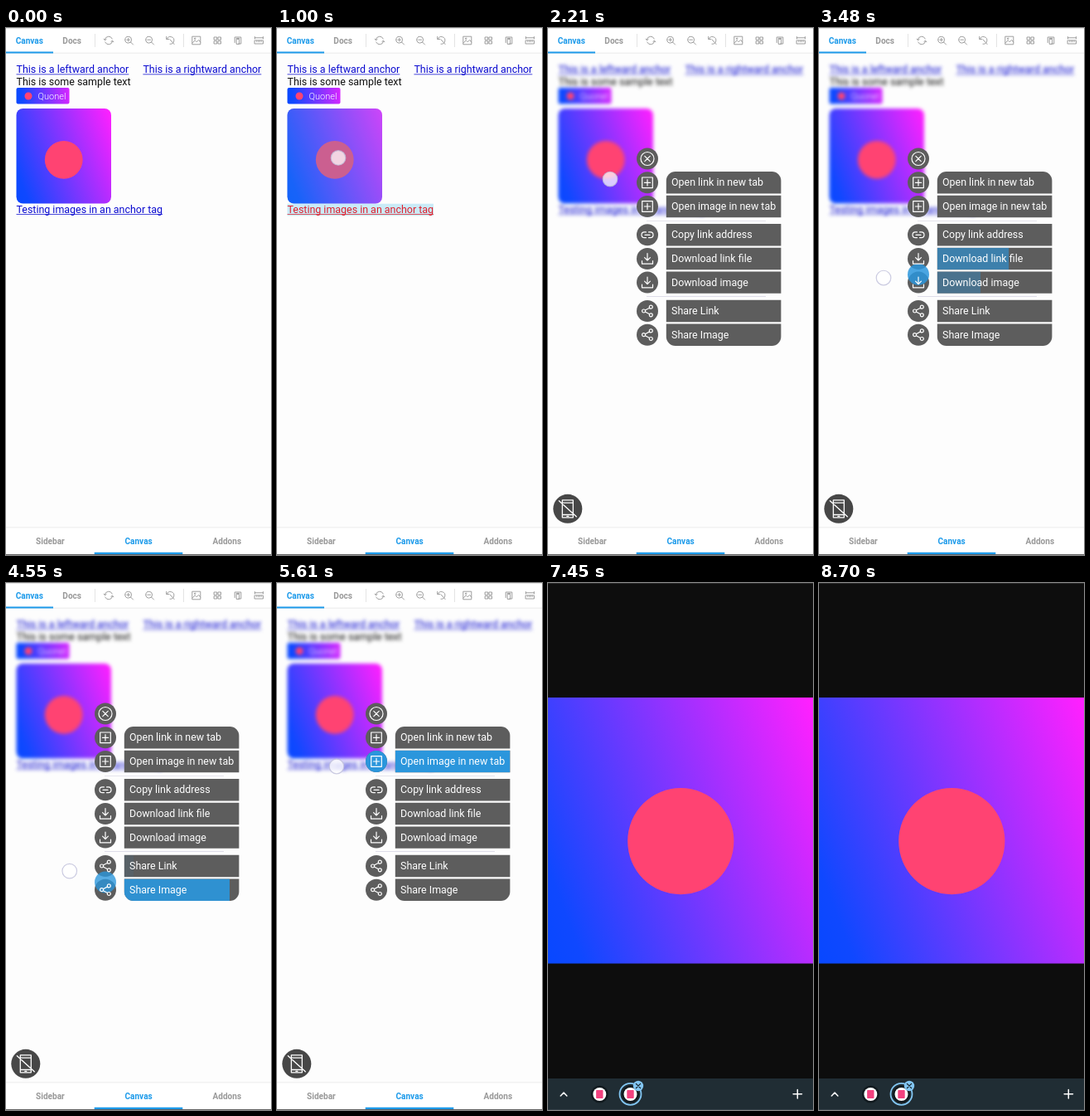
Recreate the animation shown at these times as an HTML page with a canvas. Size 320 by 635 pixels, loop 8.73 s.

```html
<!DOCTYPE html>
<html lang="en">
<head>
<meta charset="utf-8">
<title>Context menu demo</title>
<style>
html, body { margin: 0; width: 100%; height: 100%; overflow: hidden; background: #fdfdfd; }
canvas { display: block; width: 320px; height: 635px; }
</style>
</head>
<body>
<canvas id="stage"></canvas>
<script>
const W = 320, H = 635, LOOP = 8730;
const BLUE = '#1c9aea', GREY = '#999', SLATE = '#5d5d5d';
const dpr = window.devicePixelRatio || 1;
const stage = document.getElementById('stage');
const layer = document.createElement('canvas');
for (const c of [stage, layer]) { c.width = W * dpr; c.height = H * dpr; }
const main = stage.getContext('2d'), soft = layer.getContext('2d');
let g = main;

const clamp = v => Math.max(0, Math.min(1, v));
const ease = v => v * v * (3 - 2 * v);
const ramp = (t, from, len) => ease(clamp((t - from) / len));

// ---- drawing helpers ----
function box(x, y, w, h, fill, r = 0) {
  g.fillStyle = fill;
  g.beginPath();
  g.roundRect(x, y, w, h, r);
  g.fill();
}
function disc(x, y, r, fill) {
  g.fillStyle = fill;
  g.beginPath();
  g.arc(x, y, r, 0, Math.PI * 2);
  g.fill();
}
function text(str, x, y, fill, size = 12.45, weight = 400, align = 'left') {
  g.font = `${weight} ${size}px Roboto, sans-serif`;
  g.textAlign = align;
  g.fillStyle = fill;
  g.fillText(str, x, y);
  return g.measureText(str).width;
}
function link(str, x, y, color) {
  const w = text(str, x, y, color);
  box(x, y + 1.2, w, 0.9, color);
}
function icon(path, x, y, color, width = 1) {
  g.save();
  g.translate(x, y);
  g.strokeStyle = color;
  g.lineWidth = width;
  g.lineCap = g.lineJoin = 'round';
  g.stroke(new Path2D(path));
  g.restore();
}

// ---- icon outlines, centred on 0,0 ----
const ring = (x, y, r) => `M${x - r} ${y}a${r} ${r} 0 1 0 ${2 * r} 0a${r} ${r} 0 1 0 ${-2 * r} 0`;
const rect = (x, y, w, h) => `M${x} ${y}h${w}v${h}h${-w}z`;
const lens = ring(-0.8, -0.8, 3.9) + 'M2.1 2.1L5 5M-2.6-.8h3.6';
const tools = [
  [124, 'M-4.6-1A4.7 4.7 0 0 1 4.3-2M4.6 1A4.7 4.7 0 0 1-4.3 2M-5.8-1.8l1.2 1.6 1.6-1M5.8 1.8l-1.2-1.6-1.6 1'],
  [148.5, lens + 'M-.8-2.6v3.6'],
  [173.5, lens],
  [198.5, 'M-4.2-1.6A4.4 4.4 0 1 1-.5 4.3M-4.8-4.6v3.2h3.2M-.4-1L4.6 4.6'],
  [230, rect(-4.8, -4.8, 9.6, 9.6) + 'M-4.8 3l3-3.2 2 2L2.6-.6 4.8 2' + ring(-1.8, -2.2, 0.8)],
  [255.5, [[-4, -4], [0.8, -4], [-4, 0.8], [0.8, 0.8]].map(p => rect(p[0], p[1], 3.2, 3.2)).join('')],
  [280, 'M-3.8 2.5v-6.5h7.6v8h-3M-1.8 4v-5.6h3.4v5.6zM-1.8-2.6h3.6'],
  [305.5, rect(-5, 0, 10, 4) + 'M-2.5 0v1.8M0 0v1.8M2.5 0v1.8M-5-3.2h10M-5-4.4v2.4M5-4.4v2.4']
];
const plus = rect(-6.3, -6.3, 12.6, 12.6) + 'M-3.6 0h7.2M0-3.6v7.2';
const chain = 'M-1.6-3.4h-2a3.4 3.4 0 0 0 0 6.8h2M1.6-3.4h2a3.4 3.4 0 0 1 0 6.8h-2M-3 0h6';
const down = 'M0-6.5v8.4M-3.4-1.4L0 2l3.4-3.4M-6.5 2.5v3.7h13v-3.7';
const share = ring(-4.4, 0, 2) + ring(4.3, -4.8, 2) + ring(4.3, 4.8, 2) + 'M-2.6-1L2.6-3.8M-2.6 1L2.6 3.8';
const close = ring(0, 0, 8) + 'M-3.2-3.2L3.2 3.2M3.2-3.2L-3.2 3.2';

const items = [
  ['Open link in new tab', 186.3, plus],
  ['Open image in new tab', 215, plus],
  ['Copy link address', 249.3, chain],
  ['Download link file', 278, down],
  ['Download image', 306.6, down],
  ['Share Link', 341, share],
  ['Share Image', 369.7, share]
];

// ---- timing ----
const PRESS = 560, OPEN = 1240, DROP = 5780, TAB = 6060;
const path = [
  [0, 74, 156], [2120, 74, 157], [2210, 75, 182], [2600, 75, 200], [2900, 76, 232],
  [3120, 77, 264], [3360, 78, 292], [3480, 78, 301], [3800, 78, 324], [4150, 77, 355],
  [4300, 77, 366], [4500, 77, 355], [4700, 76, 324], [4880, 75, 292], [5020, 74, 264],
  [5180, 73, 230], [5400, 72, 221], [LOOP, 72, 221]
];
// time at which each item becomes the chosen one
const picks = [[2240, 0], [2600, 1], [2900, 2], [3120, 3], [3360, 4], [3800, 5], [4150, 6],
  [4500, 5], [4700, 4], [4880, 3], [5020, 2], [5180, 1]];
const FILL = 290;

function finger(t) {
  const i = path.findIndex(p => p[0] > t);
  const a = path[i - 1], b = path[i], k = (t - a[0]) / (b[0] - a[0]);
  return [a[1] + (b[1] - a[1]) * k, a[2] + (b[2] - a[2]) * k];
}
function fillOf(item, t) {
  let level = 0;
  picks.forEach(([at, n], i) => {
    if (n !== item || t < at) return;
    const out = i + 1 < picks.length ? ramp(t, picks[i + 1][0], FILL) : 0;
    level = Math.max(level, ramp(t, at, FILL) * (1 - out));
  });
  return level;
}

// ---- page ----
function gradient(x, y, w, h) {
  const d = g.createLinearGradient(x, y + h, x + w * 1.19, y + h * 0.55);
  d.addColorStop(0, '#0848ff');
  d.addColorStop(0.1, '#0f48ff');
  d.addColorStop(1, '#ff20ff');
  return d;
}
function picture(x, y, size, r) {
  box(x, y, size, size, gradient(x, y, size, size), r);
  disc(x + size * 0.5, y + size * 0.54, size * 0.2, '#ff4372');
}
function content(held) {
  const ink = '#0b0bd0';
  link('This is a leftward anchor', 12.5, 54.2, ink);
  link('This is a rightward anchor', 165.4, 54.2, ink);
  text('This is some sample text', 12.5, 68.8, '#111');
  box(12.5, 72, 64, 19.5, gradient(12.5, 72, 64, 19.5), 2);
  disc(27, 82, 4.5, '#ff4372');
  text('Quonel', 38.5, 86, '#fff', 11, 300);
  picture(12.5, 97, 114.5, 8);
  const tap = `rgba(51,181,229,${0.25 * held})`;
  box(12.5, 97, 114.5, 114.5, tap, 8);
  box(12.5, 211.8, 176.5, 14.4, tap);
  link('Testing images in an anchor tag', 12.5, 223, held > 0.5 ? '#e0202c' : ink);
}
function chrome() {
  box(0, 0, W, 30, '#fff');
  box(0, 0, W, 0.8, '#ddd');
  box(0, 29.7, W, 0.8, '#e4e4e4');
  box(0, 28.4, 57, 2.2, BLUE);
  text('Canvas', 28.3, 18.6, BLUE, 10.11, 700, 'center');
  text('Docs', 79.7, 18.6, GREY, 10.11, 700, 'center');
  box(107, 7, 0.8, 16, '#ddd');
  box(214, 7, 0.8, 16, '#ddd');
  for (const [x, p] of tools) icon(p, x, 15, GREY, 0.95);
  box(0, 602, W, 33, '#fff');
  box(0, 601.5, W, 0.8, '#e8e8e8');
  ['Sidebar', 'Canvas', 'Addons'].forEach((s, i) =>
    text(s, 53.4 + i * 106.7, 622.3, i === 1 ? BLUE : GREY, 10.11, 700, 'center'));
  box(106.7, 631.8, 106.6, 2.4, BLUE);
  box(0, 634.2, W, 0.8, '#333');
}

function menu(t, show) {
  g.save();
  g.globalAlpha = show;
  for (const y of [232.3, 323.5]) box(119, y - 0.4, 144, 0.8, '#dedce8');
  disc(120, 157.5, 13, SLATE);
  icon(close, 120, 157.5, '#fff', 1.2);
  for (const [, y] of items) disc(120, y, 13, SLATE);

  // blue marker gliding between the round icons
  let n = picks.length - 1;
  while (n >= 0 && picks[n][0] > t) n--;
  if (n >= 0) {
    const k = clamp((t - picks[n][0]) / FILL);
    const to = items[picks[n][1]][1], from = n ? items[picks[n - 1][1]][1] : to;
    const glide = 1 - (1 - k) * (1 - k);
    g.globalAlpha = show * (n ? 0.75 + 0.25 * k : k);
    disc(120, from + (to - from) * glide, 13, '#2b96dc');
    g.globalAlpha = show;
  }
  items.forEach(([label, y, p], i) => {
    icon(p, 120, y, '#fff', 1.2);
    const r = i === 0 ? [11, 11, 0, 0] : i === items.length - 1 ? [0, 0, 11, 11] : 0;
    g.save();
    box(142.8, y - 13.2, 138.6, 26.4, SLATE, r);
    const f = fillOf(i, t);
    if (f > 0) {
      g.clip();
      g.globalAlpha = show * f;
      box(142.8, y - 13.2, 138.6 * f, 26.4, '#2b96dc');
    }
    g.restore();
    text(label, 149, y + 4.1, '#fff');
  });
  disc(23.8, 579.3, 17.5, '#474747');
  icon(rect(-6.5, -10.5, 13, 21) + 'M-6.5-7.2h13M-6.5 7.2h13M-1 9h2M-10.5-9.5L10.5 9.5', 23.8, 579.3, '#fff', 1.3);
  g.restore();
}

function blurred(amount) {
  g = soft;
  g.setTransform(dpr, 0, 0, dpr, 0, 0);
  g.clearRect(0, 0, W, H);
  content(0);
  g = main;
  g.save();
  g.filter = `blur(${amount * dpr}px)`;
  g.drawImage(layer, 0, 0, W, H);
  g.restore();
}

function touch(t) {
  const a = ramp(t, PRESS, 120) * (1 - ramp(t, DROP, 140));
  if (!a) return;
  const [x, y] = finger(t);
  g.save();
  g.globalAlpha = a;
  disc(x, y, 8.8, 'rgba(255,255,255,.74)');
  g.strokeStyle = 'rgba(190,190,218,.8)';
  g.lineWidth = 1.2;
  g.stroke();
  g.restore();
}

// ---- image tab ----
function favicon(x) {
  disc(x, 616, 10.5, '#111a1f');
  disc(x, 616, 8, '#fff');
  box(x - 4.2, 611, 8.4, 10, '#f2427f', 0.8);
}
function imageTab(show) {
  g.save();
  g.globalAlpha = show;
  box(0, 0, W, H, '#0d0d0d');
  box(0, 0, W, 0.8, '#333');
  picture(0, 138, 320.6, 0);
  box(0, 597, W, 38, '#202d34');
  icon('M-3.8 2L0-2 3.8 2', 19, 616, '#fff', 1.5);
  favicon(62.3);
  favicon(99.5);
  icon(ring(0, 0, 13), 99.5, 615.8, '#82c6f2', 1.8);
  disc(109, 606, 6.2, '#82c6f2');
  icon('M-2.6-2.6L2.6 2.6M2.6-2.6L-2.6 2.6', 109, 606, '#17242c', 1.3);
  icon('M-5.2 0h10.4M0-5.2v10.4', 301.3, 615.8, '#fff', 1.5);
  box(0, 634.2, W, 0.8, '#39454c');
  g.restore();
}

function draw(t) {
  g = main;
  g.setTransform(dpr, 0, 0, dpr, 0, 0);
  const tab = ramp(t, TAB, 220);
  if (tab < 1) {
    box(0, 0, W, H, '#fdfdfd');
    const show = ramp(t, OPEN, 200) * (1 - ramp(t, DROP, 200));
    if (show > 0) blurred(2.1 * show);
    else content(t < OPEN + 1 ? ramp(t, 680, 120) : 0);
    chrome();
    if (show > 0) menu(t, show);
    touch(t);
  }
  if (tab > 0) imageTab(tab);
}

const start = performance.now();
function tick() {
  draw((performance.now() - start) % LOOP);
  requestAnimationFrame(tick);
}
tick();
</script>
</body>
</html>
```
